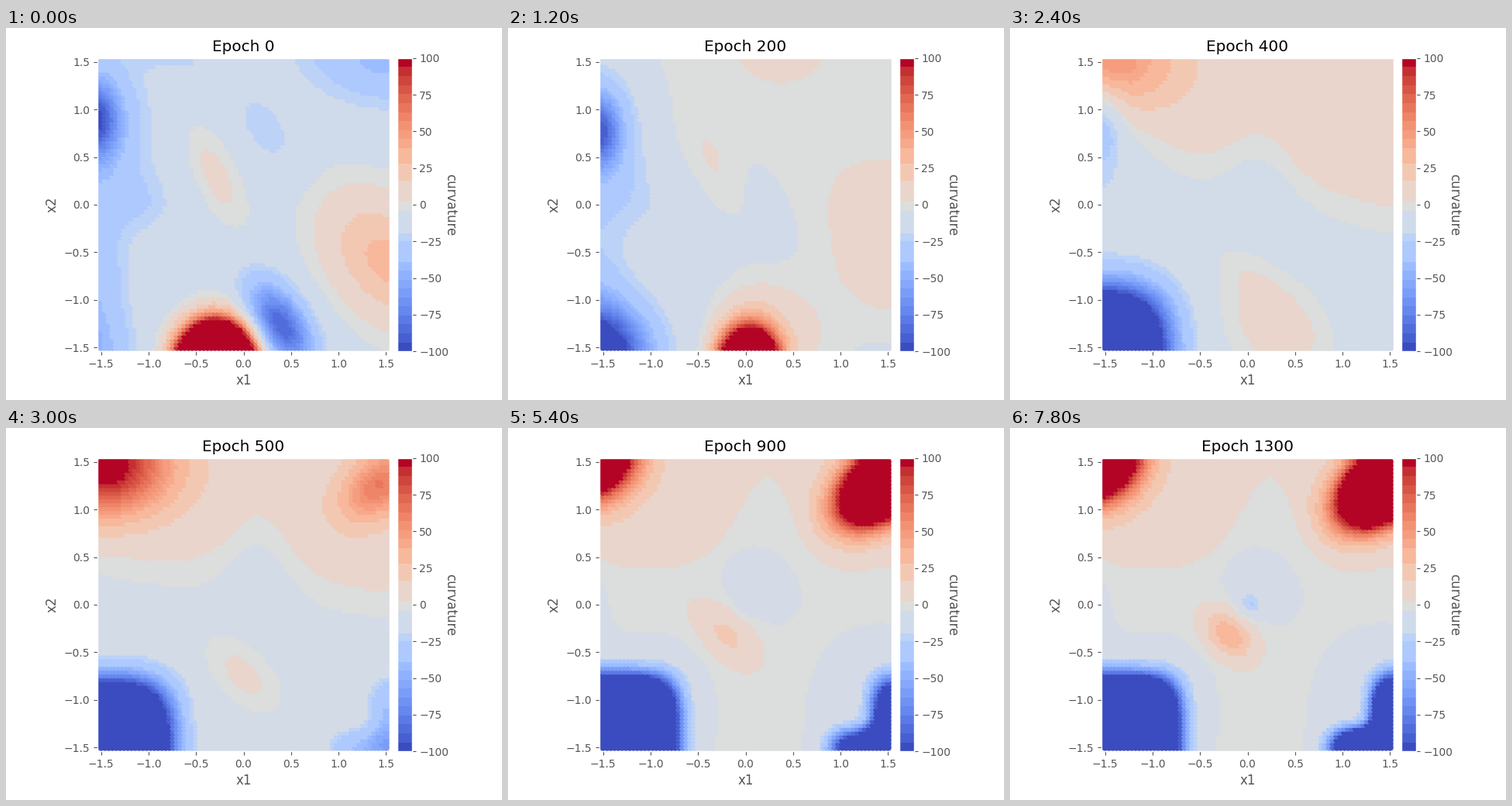
Recreate the animation shown at these times as a matplotlib script. Size 640 by 480 pixels, loop 8000 ms.

```python
import numpy as np
import matplotlib.pyplot as plt
from matplotlib.animation import FuncAnimation

plt.style.use("ggplot")

W, H = 640, 480
LIM = 1.54
HOLD, INTERVAL, LOOP = 300, 100, 8000
EPOCH_STEP = 50

grid = np.linspace(-1.5, 1.5, 76)
PX, PY = np.meshgrid(grid, grid)
# Later markers cover earlier ones, so each shows mainly its lower left part.
X, Y = PX - 0.02, PY - 0.02


def ramp(epoch, start, end):
    return np.clip((epoch - start) / (end - start), 0, 1)


def fade(epoch, start, end):
    return 1 - ramp(epoch, start, end)


def blob(x, y, amp, sx, sy, angle=0, n=2):
    """Rotated bump; n above 2 makes it flatter and more box-like."""
    c, s = np.cos(np.radians(angle)), np.sin(np.radians(angle))
    u = ((X - x) * c + (Y - y) * s) / sx
    v = ((Y - y) * c - (X - x) * s) / sy
    return amp * np.exp(-0.5 * (np.abs(u) ** n + np.abs(v) ** n))


def background(e):
    """Low plain below a wavy front, a higher one above it."""
    p = ramp(e, 300, 700)
    low = -10 + 9 * ramp(e, 400, 700)
    high = -10 + 19 * ramp(e, 100, 300)
    hump = (.25 + .7 * p) * np.exp(-((X - .1 - .12 * p) / .42) ** 2)
    front = (1 - p) * (.15 - .35 * X) + p * .45 + hump
    return low + (high - low) / (1 + np.exp((front - Y) / (.22 - .1 * p)))


def early_relief(e):
    start, young = fade(e, 0, 125), fade(e, 100, 300)
    left, drift = fade(e, 300, 500), ramp(e, 0, 100)
    passing = ramp(e, 100, 300) * left
    hill = 42 * fade(e, 0, 350)
    return (
        blob(-.3 + .32 * drift, -1.75, 700 * young, .235 - .03 * drift, .28)
        + blob(.38, -1.28, -80 * start, .36, .2, -60)
        + blob(.22, .78, -14 * start, .33, .17, -55)
        + blob(1.6, 1.65, -38 * start, .65, .4)
        + blob(-.65, 1.6, -13 * start, .35, .15)
        + blob(-.3, .3, 16 * young, .43, .17, 115)
        + blob(1.5, -.6, hill, .6, .4 + .15 * drift, -50)
        + blob(-1.55, .9 - .25 * drift * young, -58 * left, .16, .27)
        + blob(-1.6, .75, -33 * left, .4, .6)
        + blob(-1.05, 0, -10 * young, .25, .22)
        + blob(-1.6, -.9, -27 * young, .25, .55)
        + blob(.3, -1.3, 40 * passing, .45, .33, -45)
        + blob(.35, 1.6, 14 * passing, .35, .25))


def corners(e):
    size = .3 + .41 * ramp(e, 100, 600)
    box = 2 + 3 * ramp(e, 300, 700)
    shrink = ramp(e, 500, 800)
    top_left = 400 * ramp(e, 300, 1100)
    top_right = 330 * ramp(e, 400, 1000)
    low_right = -260 * ramp(e, 400, 1200)
    halo = -8 * ramp(e, 400, 700)
    return (
        blob(-1.58, -1.6, -310 * ramp(e, -50, 600), size, size, 0, box)
        + blob(-1.5 - .2 * shrink, 1.45 + .2 * shrink, top_left,
               .5 - .18 * shrink, .36 - .04 * shrink)
        + blob(1.42, 1.25, top_right, .34, .22, 40)
        + blob(1.62, -1.2, low_right, .24, .34, 0, 3)
        + blob(1.3, -1.6, low_right, .32, .22, 0, 3)
        + blob(-1.2, -1.1, halo, .74, .68, 0, 4)
        + blob(1.4, -1.1, halo, .55, .65)
        + blob(-1.6, .05, .7 * halo, .14, .3))


def centre(e):
    move = ramp(e, 500, 900)
    late = ramp(e, 700, 1300)
    peak = 13 * ramp(e, 300, 500) + 28 * late
    return (
        blob(-.02 - .19 * move, -.74 + .42 * move, peak,
             .31 - .1 * late, .17 - .02 * late, -43)
        + blob(.1, .18, -7 * ramp(e, 500, 700), .34, .32, -30)
        + blob(.02, 0, -20 * late, .09, .09))


def surface(epoch):
    return (background(epoch) + early_relief(epoch) + corners(epoch)
            + centre(epoch))


# Colour bands are wide around zero and even further out.
LEVELS = np.r_[np.linspace(-100, -39, 11), -25, -19.5, -4, 2.5, 16.5, 28,
               np.linspace(38.5, 100, 11)]
MIDS = (LEVELS[1:] + LEVELS[:-1]) / 2
MIDS[0], MIDS[-1] = -100, 100
PALE = np.digitize(-10, LEVELS) - 1
MIDS[PALE] = -9.5


def banded(epoch):
    mids = MIDS.copy()
    mids[PALE] = -10 + 3.5 * ramp(epoch, 0, 700)
    return mids[np.digitize(surface(epoch), LEVELS[1:-1])].ravel()


def pixel_axes(left, top, right, bottom):
    return fig.add_axes([left / W, 1 - bottom / H,
                         (right - left) / W, (bottom - top) / H])


fig = plt.figure(figsize=(W / 100, H / 100), dpi=100, facecolor="white")
colors = dict(cmap="coolwarm", vmin=-100, vmax=100)

TOP, BOTTOM = 38.8, 417.1
ax = pixel_axes(117.8, TOP, 495.3, BOTTOM)
dots = ax.scatter(PX.ravel(), PY.ravel(), c=banded(0), **colors)
ax.set(xlim=(-LIM, LIM), ylim=(-LIM, LIM), xlabel="x1", ylabel="x2",
       xticks=np.arange(-1.5, 1.6, .5), yticks=np.arange(-1.5, 1.6, .5))
title = ax.set_title("Epoch 0")

bar = pixel_axes(504.8, TOP, 523.6, BOTTOM)
bar.grid(False)
bar.pcolormesh([0, 1], LEVELS, MIDS[:, None], **colors)
bar.set(xlim=(0, 1), ylim=(-100, 100), xticks=[],
        yticks=np.arange(-100, 101, 25))
bar.yaxis.tick_right()
fig.text(573.5 / W, 1 - 228.5 / H, "curvature", rotation=270, size=12,
         color="#555555", ha="center", va="center")


def update(frame):
    epoch = EPOCH_STEP * (frame * INTERVAL // HOLD)
    dots.set_array(banded(epoch))
    title.set_text(f"Epoch {epoch}")
    return dots, title


anim = FuncAnimation(fig, update, frames=LOOP // INTERVAL, interval=INTERVAL,
                     repeat=True, repeat_delay=0)
plt.show()
```
